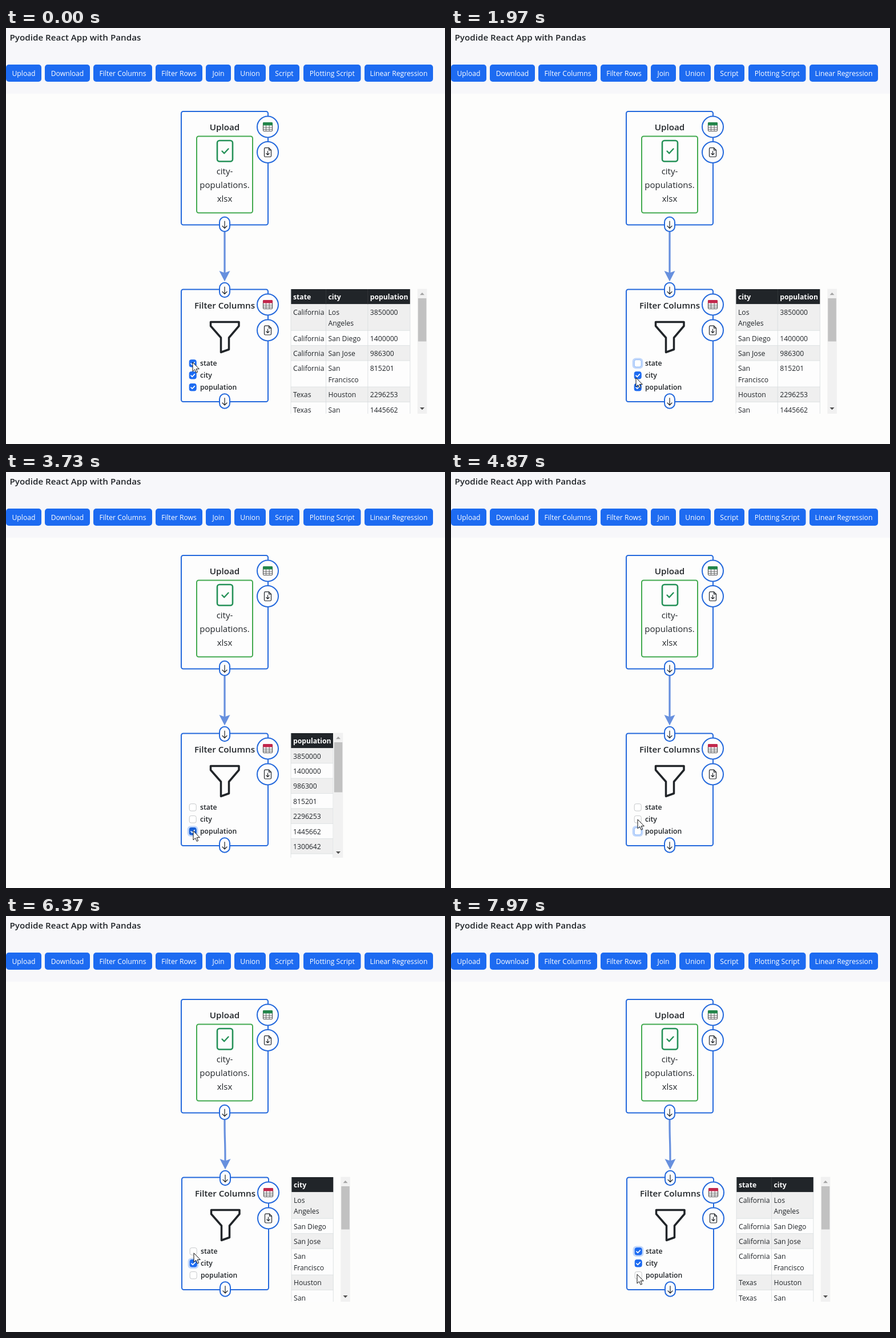
Animation of 769x728 px, one loop 8000 ms. Source, as an HTML page:

```html
<!DOCTYPE html>
<html lang="en">
<head>
<meta charset="utf-8">
<title>Pyodide React App with Pandas</title>
<style>
  html, body { margin: 0; width: 100%; height: 100%; overflow: hidden; background: #fdfdfc; }
  svg { display: block; width: 100vw; height: 100vh; }
  text { font: 12.2px "Open Sans", "Noto Sans", sans-serif; fill: #212529; }
  .title { font-size: 15.2px; font-weight: 600; }
  .file { font-size: 15px; }
  .label { font-weight: 600; }
  .head { font-weight: 700; fill: #fff; }
  .button { font-size: 12.2px; fill: #fff; }
  .mid { text-anchor: middle; }
  .outline { fill: #fdfdfd; stroke: #2469dc; stroke-width: 2; }
  .ink { fill: none; stroke: #212529; stroke-width: 1.2; stroke-linecap: round; stroke-linejoin: round; }
</style>
</head>
<body>
<svg viewBox="0 0 769 728">
  <defs>
    <g id="handle">
      <rect class="outline" x="-9" y="-12.7" width="18" height="25.4" rx="9"/>
      <path class="ink" d="M0 -5.5V7M-4 3L0 7L4 3"/>
    </g>
    <g id="grid">
      <circle class="outline" r="18.5"/>
      <rect x="-8" y="-7.5" width="16" height="15" rx="1.5" fill="#fff" stroke="#555" stroke-width="1.2"/>
      <path d="M-8 1H8M-8 4.4H8M-3 -3V7.5M2.7 -3V7.5" stroke="#666"/>
      <path d="M-8.5 -2.6V-6.5Q-8.5 -8 -7 -8H7Q8.5 -8 8.5 -6.5V-2.6Z" fill="currentColor"/>
    </g>
    <g id="save">
      <circle class="outline" r="18.5"/>
      <path class="ink" d="M2 -7.8H-4.2Q-6 -7.8 -6 -6V6.2Q-6 8 -4.2 8H4.2Q6 8 6 6.2V-3.8ZM2 -7.8V-3.8H6M0 -2V4.5M-2.6 2L0 4.6L2.6 2"/>
    </g>
    <clipPath id="viewport"><rect x="498" y="456" width="260" height="219"/></clipPath>
  </defs>

  <rect width="769" height="728" fill="#fdfdfc"/>
  <rect width="769" height="115" fill="#f7f7fa"/>
  <text class="title" x="6.5" y="22">Pyodide React App with Pandas</text>
  <g id="toolbar"></g>

  <rect class="outline" x="307" y="146" width="152" height="198.5" rx="3.5"/>
  <text class="title mid" x="383" y="178.5">Upload</text>
  <rect x="334" y="189.5" width="98" height="134" rx="3.5" fill="none" stroke="#43aa50" stroke-width="2"/>
  <rect x="370" y="197" width="27" height="36.5" rx="4" fill="none" stroke="#259158" stroke-width="2.6"/>
  <path d="M378.5 215.5L382.3 219.3L389.5 211.5" fill="none" stroke="#259158" stroke-width="2.4" stroke-linecap="round" stroke-linejoin="round"/>
  <text class="file mid" x="383" y="255.5">city-</text>
  <text class="file mid" x="383" y="279.5">populations.</text>
  <text class="file mid" x="383" y="303.5">xlsx</text>
  <use href="#grid" x="458.5" y="173" color="#23854a"/>
  <use href="#save" x="458.5" y="217.5"/>

  <path id="edge" fill="none" stroke="#6790de" stroke-width="3.2"/>
  <use href="#handle" x="383" y="343.5"/>

  <g id="lower">
    <path d="M373.5 425L383 428.5L392.5 425L383 443.5Z" fill="#6790de"/>
    <rect class="outline" x="307" y="457.5" width="152" height="196.5" rx="3.5"/>
    <text class="title mid" x="383" y="490.5">Filter Columns</text>
    <path class="ink" style="stroke-width:3.5" d="M358.5 514.5H408V521.5L390.5 542V562.5L376.5 567.5V542L358.5 521.5Z"/>
    <use href="#handle" x="383" y="458.5"/>
    <use href="#handle" x="383" y="653"/>
    <use href="#grid" x="458.5" y="484" color="#c2274b"/>
    <use href="#save" x="458.5" y="529"/>
    <g id="boxes"></g>
    <g id="table" clip-path="url(#viewport)"></g>
  </g>
  <path id="cursor" d="M0 0V16L3.7 12.6L6.2 18.3L8.6 17.2L6.2 11.7H11.3Z" fill="#fff" stroke="#111" stroke-linejoin="round"/>
</svg>
<script>
const LOOP = 8000;
const BLUE = '#1d6bf1';
const get = id => document.getElementById(id);
const rect = (x, y, w, h, fill, more = '') =>
  `<rect x="${x}" y="${y}" width="${w}" height="${h}" fill="${fill}" ${more}/>`;
const text = (x, y, s, cls = '') => `<text x="${x}" y="${y}" class="${cls}">${s}</text>`;

const buttons = [['Upload', 0, 62], ['Download', 68, 147], ['Filter Columns', 153, 256],
  ['Filter Rows', 262, 344], ['Join', 350, 394], ['Union', 400, 455], ['Script', 461, 514],
  ['Plotting Script', 521, 621.5], ['Linear Regression', 628, 748]];
get('toolbar').innerHTML = buttons.map(([name, left, right]) =>
  rect(left, 64, right - left, 30, BLUE, 'rx="5"') +
  text((left + right) / 2, 84, name, 'button mid')).join('');

const columns = [
  { name: 'state', width: 61.5 },
  { name: 'city', width: 73.3 },
  { name: 'population', width: 74 }
];
const rows = [
  ['California', 'Los Angeles', 3850000], ['California', 'San Diego', 1400000],
  ['California', 'San Jose', 986300], ['California', 'San Francisco', 815201],
  ['Texas', 'Houston', 2296253], ['Texas', 'San Antonio', 1445662],
  ['Texas', 'Dallas', 1300642], ['Texas', 'Austin', 964254]
];
const wrap = s => String(s).length > 10 ? s.split(' ') : [s];

// Column sets are bit masks: 1 state, 2 city, 4 population.
const checks = [[0, 7], [500, 6], [2400, 4], [3800, 0], [5720, 2], [6700, 3]];
const tables = [[0, 7], [650, 6], [2550, 4], [3930, 0], [5880, 2], [6850, 3]];
const focus = [[0, -1], [420, 0], [2320, 1], [3700, 2], [5640, 1], [6620, 0]];
const pressed = [[0, 0], [420, 1], [500, 0], [2320, 1], [2400, 0], [3700, 1], [3800, 0],
  [5640, 1], [5720, 0], [6620, 1], [6700, 0]];
const shifts = [[0, 0], [5660, 1]];
const pointer = [[0, 327, 585], [1000, 327, 585], [1700, 324, 612], [2000, 324, 612],
  [2250, 327, 608], [2900, 327, 608], [3450, 328, 628], [4150, 328, 628], [4700, 327, 608],
  [5550, 327, 608], [5680, 329, 610], [6000, 329, 610], [6450, 329, 588], [7250, 329, 588],
  [7850, 326, 627], [LOOP, 326, 627]];

const valueAt = (steps, t) => steps.findLast(([start]) => start <= t)[1];

function pointerAt(t) {
  const i = pointer.findLastIndex(([start]) => start <= t);
  const [t0, x0, y0] = pointer[i];
  const [t1, x1, y1] = pointer[i + 1];
  const p = (t - t0) / (t1 - t0);
  const e = p * p * (3 - 2 * p);
  return [x0 + (x1 - x0) * e, y0 + (y1 - y0) * e];
}

function boxesMarkup(mask, focused, down) {
  return columns.map(({ name }, i) => {
    const y = 580.7 + i * 20.9;
    const on = mask >> i & 1;
    const active = focused === i;
    const ring = active ? rect(317.6, y - 3.2, 18.8, 18.8, '#c1d7fb', 'rx="6"') : '';
    const fill = on ? (active && down ? '#1860d6' : BLUE) : '#fff';
    const border = on ? fill : active ? '#8db9fa' : '#c6c8ca';
    const tick = on ? `<path d="M324 ${y + 6.5}l2.2 2.2 4.2-4.4" fill="none" stroke="#fff" stroke-width="1.7" stroke-linecap="round" stroke-linejoin="round"/>` : '';
    return ring + rect(321.2, y, 12, 12.4, fill, `rx="3" stroke="${border}"`) + tick +
      text(340, y + 10, name, 'label');
  }).join('');
}

function tableMarkup(mask) {
  if (!mask) return '';
  const left = 499;
  const top = 457;
  const shown = columns.map((c, i) => ({ ...c, i })).filter(c => mask >> c.i & 1);
  const hasCity = mask & 2;
  const width = shown.reduce((sum, c) => sum + c.width, 0);
  let x = left;
  for (const c of shown) { c.x = x; x += c.width; }

  let out = rect(left, top, width, 26.3, '#212529') +
    shown.map(c => text(c.x + 4, 475.3, c.name, 'head')).join('');
  let lines = `M${left} ${top}V675`;
  let y = 483.3;
  rows.forEach((row, n) => {
    const cells = shown.map(c => wrap(row[c.i]));
    const height = 26.4 + 19.6 * (Math.max(...cells.map(c => c.length)) - 1);
    out += rect(left, y, width, height, n % 2 ? '#fdfdfd' : '#efefef');
    cells.forEach((cell, k) => cell.forEach((word, j) => {
      out += text(shown[k].x + 4, y + 18.2 + j * 19.6, word);
    }));
    y += height;
    lines += `M${left} ${y}h${width}`;
  });
  for (const c of shown) lines += `M${c.x + c.width} 483V675`;
  out += `<path d="${lines}" stroke="#d9dcdf" stroke-width=".8"/>`;
  out += shown.slice(1).map(c => rect(c.x - .4, top, .8, 26.3, '#373b3e')).join('');

  const bar = left + width + (hasCity ? 13 : 0.8);
  return out + rect(bar, 456.5, 16.5, 219, '#f1f1f1') +
    rect(bar + 1, 473, 14.5, hasCity ? 75.5 : 87.5, '#c1c1c1') +
    `<path d="M${bar + 4.2} 467.3l4-4.2 4 4.2z" fill="#a3a3a3"/>` +
    `<path d="M${bar + 4.2} 664l4 4.2 4-4.2z" fill="#505050"/>`;
}

const painted = {};
function paint(id, markup) {
  if (painted[id] !== markup) get(id).innerHTML = painted[id] = markup;
}

function render(now) {
  const t = now % LOOP;
  const shift = valueAt(shifts, t);
  paint('boxes', boxesMarkup(valueAt(checks, t), valueAt(focus, t), valueAt(pressed, t)));
  paint('table', tableMarkup(valueAt(tables, t)));
  get('lower').setAttribute('transform', `translate(${shift} 0)`);
  get('edge').setAttribute('d', `M383 357C383 400 ${383 + shift} 385 ${383 + shift} 429`);
  get('cursor').setAttribute('transform', `translate(${pointerAt(t)})`);
  requestAnimationFrame(render);
}
render(0);
</script>
</body>
</html>
```
